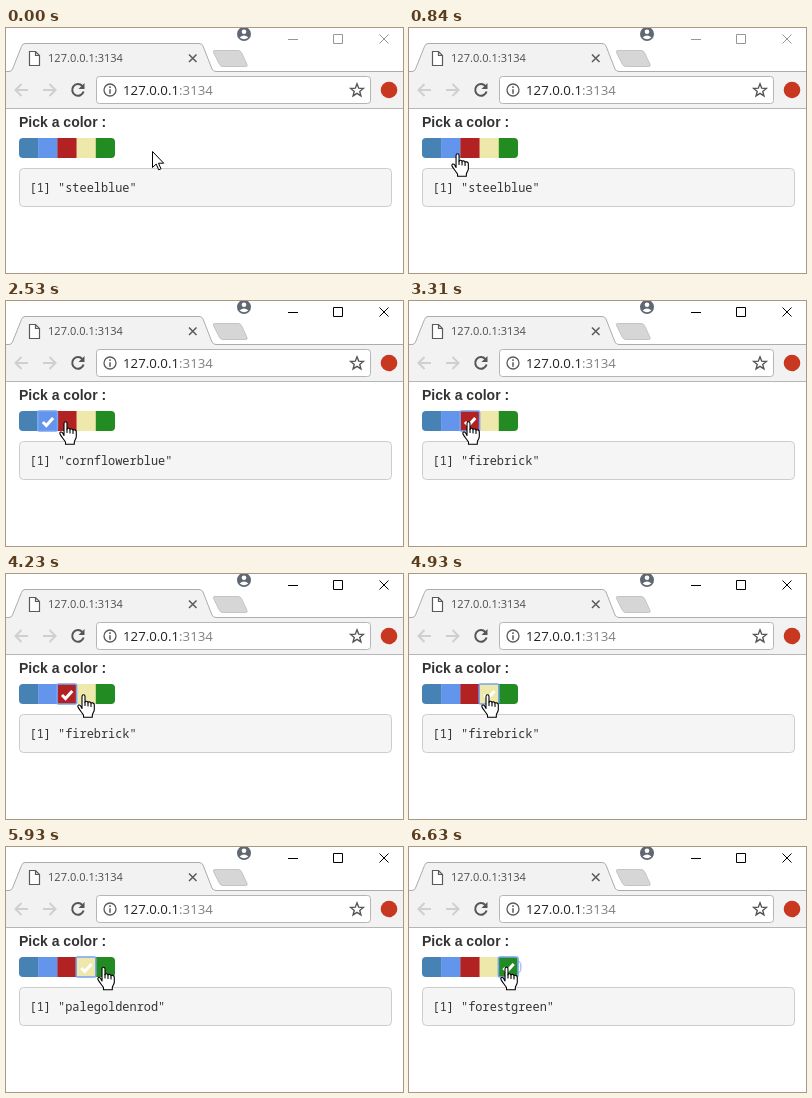
Write an HTML page that moves like this. It is 397 px wide and 245 px high and loops after 7.41 s.

```html
<!DOCTYPE html>
<html lang="en">
<head>
<meta charset="utf-8">
<title>Color picker</title>
<style>
  html, body { margin: 0; width: 100%; height: 100%; overflow: hidden; background: #fff; }
  svg { display: block; }
  .ui { font-family: "Open Sans", "Noto Sans", sans-serif; }
  .label { font: bold 14px "Liberation Sans", Arial, sans-serif; fill: #333; }
  .code { font: 11.92px "Noto Sans Mono", "DejaVu Sans Mono", monospace; fill: #333; white-space: pre; }
  .line { fill: none; stroke-width: 2; }
</style>
</head>
<body>
<svg width="397" height="245" viewBox="0 0 397 245">
  <rect width="397" height="245" fill="#fff"/>

  <!-- toolbar and tab -->
  <rect y="43" width="397" height="37" fill="#f2f2f2"/>
  <path d="M0 43.5H3Q5.500 43.500 6.500 41L15.500 18.500Q16.500 15.500 19 15.500H193Q196 15.500 197 18L206 41Q207 43.500 210 43.500H397" fill="#f2f2f2" stroke="#acacac"/>
  <path d="M5 43.500H208" stroke="#f2f2f2"/>
  <path d="M0 80.500H397" stroke="#b6b6b6"/>
  <path d="M209 22.500H232Q234.500 22.500 235.500 24.500L241 36.500Q242 38.500 239.500 38.500H217Q214.500 38.500 213.500 36.500L207.500 24.500Q206.500 22.500 209 22.500Z" fill="#d6d6d6" stroke="#c4c4c4"/>
  <path d="M23.500 23.500H29.500L33.500 27.500V37.500H23.500ZM29.500 23.500V27.500H33.500" fill="#fff" stroke="#5a5a5a" stroke-width="1.200"/>
  <text class="ui" x="42" y="34" font-size="11.050" fill="#4c4c4c">127.0.0.1:3134</text>
  <path d="M183 26.500L190.500 34M190.500 26.500L183 34" stroke="#5a5a5a" stroke-width="1.500"/>

  <!-- profile badge -->
  <circle cx="238" cy="6" r="7" fill="#5f6872"/>
  <circle cx="238" cy="3.800" r="2.300" fill="#fff"/>
  <path d="M233.600 9.500Q238 5.500 242.400 9.500Q238 13 233.600 9.500Z" fill="#fff"/>

  <g id="controls" fill="none">
    <path d="M282 11.500H292M327.500 6.500H336.500V15.500H327.500ZM373.500 6.500L382.500 15.500M382.500 6.500L373.500 15.500"/>
  </g>

  <!-- navigation -->
  <path class="line" d="M22 62H10M15.500 56L9.500 62L15.500 68M37 62H49M43.500 56L49.500 62L43.500 68" stroke="#cfcfcf"/>
  <path class="line" d="M76.300 58A5.800 5.800 0 1 0 77.600 63.500" stroke="#555"/>
  <path d="M78.500 55V61H72.500Z" fill="#555"/>
  <rect x="90.500" y="48.500" width="274" height="27" rx="3" fill="#fff" stroke="#b5b5b5"/>
  <circle cx="104" cy="62" r="6" fill="none" stroke="#5a5a5a" stroke-width="1.300"/>
  <path d="M104 58.300V60M104 61.200V65.700" stroke="#5a5a5a" stroke-width="1.500"/>
  <text class="ui" x="117" y="66.500" font-size="13.250" fill="#222">127.0.0.1<tspan fill="#808080">:3134</tspan></text>
  <path id="star" fill="none" stroke="#555" stroke-width="1.400"/>
  <circle cx="383" cy="62" r="8.300" fill="#c8371f"/>

  <!-- page -->
  <text class="label" x="13" y="98.500">Pick a color :</text>
  <clipPath id="round"><rect x="13" y="110" width="96" height="20" rx="4"/></clipPath>
  <rect id="halo" y="114" width="13" height="12" rx="4" fill="#fff" stroke="#a6c8f5" stroke-width="1.500"/>
  <g id="swatches" clip-path="url(#round)"></g>
  <rect id="ring" y="110" width="19.600" height="20" rx="1.500" fill="none" stroke="#78a4f2" stroke-width="1.600"/>
  <path id="check" d="M-5 1L-1.500 4.500L5.300 -3" fill="none" stroke="#fff" stroke-width="3"/>
  <rect x="13.500" y="140.500" width="372" height="38" rx="4" fill="#f5f5f5" stroke="#ccc"/>
  <text id="output" class="code" x="23.500" y="164"></text>

  <!-- pointers -->
  <path id="arrow" d="M.5 .5V16.500L4.200 13L6.700 18.800L9 17.800L6.500 12.200H11.700Z" fill="#fff" stroke="#000"/>
  <g id="hand" stroke="#000" stroke-width="1.100" stroke-linejoin="round" stroke-linecap="round">
    <path d="M5 14.500V2.500C5 .2 8 .2 8 2.500V8.300C8 6.700 11 6.900 11 8.700C11 7.400 14 7.600 14 9.400C14 8.400 17.300 8.600 17.300 10.700V15.500C17.300 18 15.600 19 15.300 21V23.300H6.500V21C5 18.500 2 15.500 1 13C.2 11 2.500 10.300 3.500 11.800Z" fill="#fff"/>
    <path d="M8 8V11.500M11 9V12M14 10V12.500" fill="none"/>
  </g>
</svg>
<script>
const LOOP = 7410;
const COLORS = ["steelblue", "cornflowerblue", "firebrick", "palegoldenrod", "forestgreen"];
const CELL = 19.2;
const TIP = 6.5; // fingertip offset inside the hand

// Pointer moves: start, end, steps, target x, target y
const MOVES = [
  [380, 1070, 10, 43.5, 120],
  [1160, 1160, 1, 42.5, 118],
  [2220, 2530, 5, 59.5, 120],
  [3920, 4230, 5, 77.5, 120],
  [4470, 4470, 1, 78.5, 120],
  [5640, 5930, 5, 97.5, 119.5]
];

// Clicks: swatch, old one cleared, check shown, ring shown, text shown
const CLICKS = [
  [1, 1390, 1460, 1540, 1610],
  [2, 3080, 3150, 3230, 3310],
  [3, 4780, 4860, 4930, 5010],
  [4, 6480, 6630, 6630, 6630]
];

const $ = id => document.getElementById(id);
const show = (el, on) => el.setAttribute("visibility", on ? "visible" : "hidden");
const place = (el, x, y) => el.setAttribute("transform", `translate(${x} ${y})`);
const cellX = i => 13 + CELL * i;

$("swatches").innerHTML = COLORS.map((c, i) =>
  `<rect x="${cellX(i)}" y="110" width="${CELL + .3}" height="20" fill="${c}"/>`).join("");

$("star").setAttribute("d", "M" + Array.from({ length: 10 }, (_, i) => {
  const r = i % 2 ? 2.9 : 6.7, a = Math.PI * (i / 5 - .5);
  return `${(351 + r * Math.cos(a)).toFixed(2)} ${(62.5 + r * Math.sin(a)).toFixed(2)}`;
}).join("L") + "Z");

function pointer(t) {
  let x = 146, y = 123;
  for (const [start, end, steps, tx, ty] of MOVES) {
    if (t < start) break;
    const gap = steps > 1 ? (end - start) / (steps - 1) : 1;
    const p = Math.min(1, (Math.floor((t - start) / gap + .05) + 1) / steps);
    const first = start === 380;
    const e = first ? 1 - (1 - p) ** 2.5 : p;
    const dip = first ? 6 * Math.sin(Math.PI * p) : 0;
    x += (tx - x) * e;
    y += (ty - y) * e + dip;
    if (p < 1) break;
  }
  return [x, y];
}

function draw(t) {
  const [x, y] = pointer(t);
  const over = x < 109 && y < 130;
  show($("hand"), over);
  show($("arrow"), !over);
  place($("hand"), x - TIP, y);
  place($("arrow"), x, y);

  let checked = -1, focused = -1, value = 0;
  for (const [i, clear, check, ring, text] of CLICKS) {
    if (t >= clear) checked = focused = -1;
    if (t >= check) checked = i;
    if (t >= ring) focused = i;
    if (t >= text) value = i;
  }
  show($("check"), checked >= 0);
  place($("check"), cellX(checked) + CELL / 2, 120);
  show($("ring"), focused >= 0);
  show($("halo"), focused >= 0);
  $("ring").setAttribute("x", cellX(focused) - .4);
  $("halo").setAttribute("x", cellX(focused) + 9);
  $("output").textContent = `[1] "${COLORS[value]}"`;
  $("controls").setAttribute("stroke", t < CLICKS[0][1] ? "#969696" : "#000");
}

const begin = performance.now();
function tick() {
  draw((performance.now() - begin) % LOOP);
  requestAnimationFrame(tick);
}
tick();
</script>
</body>
</html>
```
